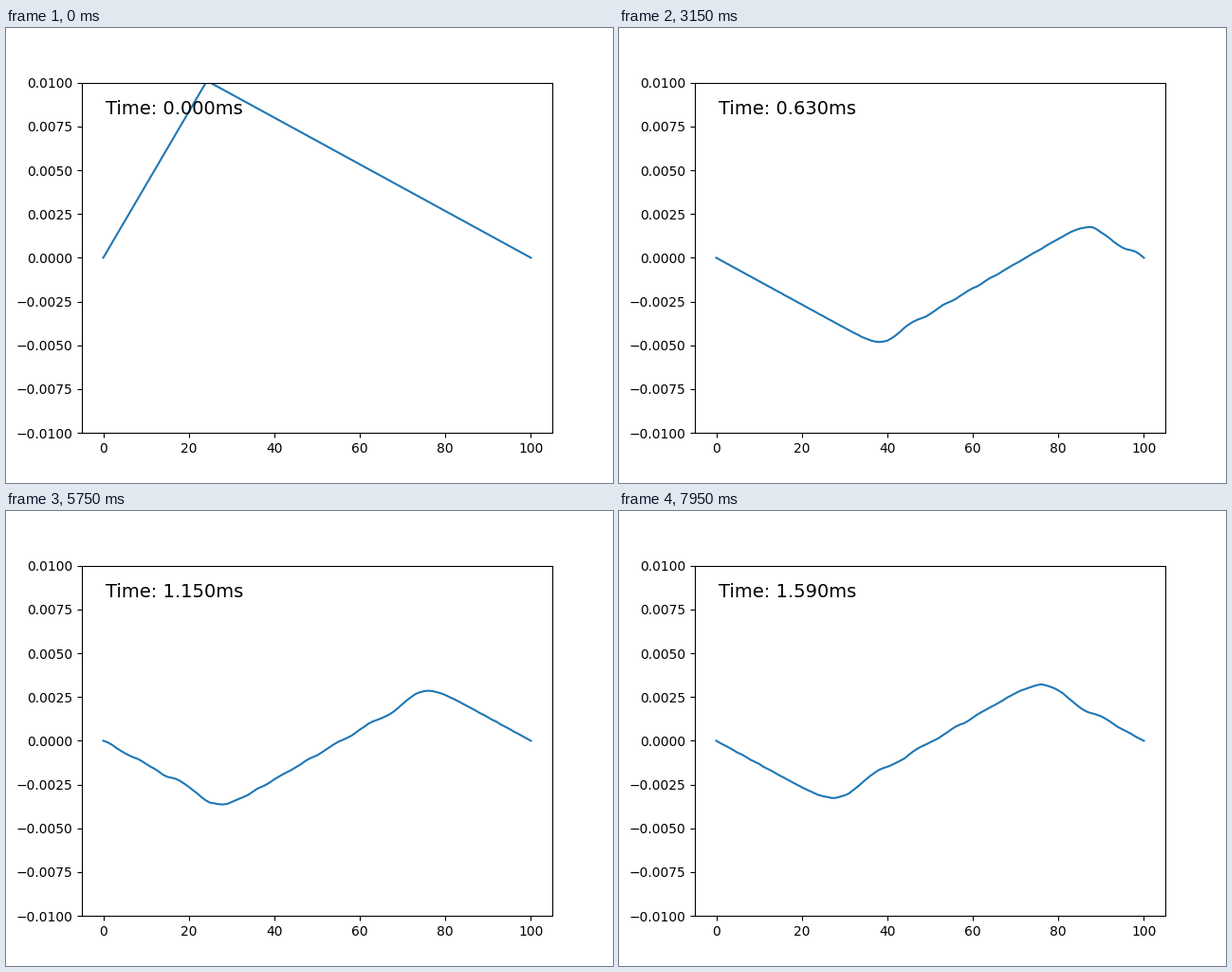
A matplotlib script that plays this animation: 640x480 px, repeating every 8000 ms.

```python
import numpy as np
import matplotlib.pyplot as plt
from matplotlib.animation import FuncAnimation

FRAMES = 160
INTERVAL = 50          # ms on screen per frame
STEPS = 10             # solver steps per frame
DT = 1e-6              # s per solver step

LENGTH = 0.7
PITCH = 1100           # Hz, fundamental of the string
NX = 101
DX = LENGTH / (NX - 1)
SPEED = 2 * LENGTH * PITCH


def pluck():
    """Triangular starting shape, pulled up at a quarter of the string."""
    rise = np.linspace(0, 0.01, 25)
    fall = np.linspace(0.01, 0, NX - 25)
    return np.concatenate([rise, fall])


def solve():
    """Leapfrog solution of the wave equation with fixed ends."""
    r2 = (SPEED * DT / DX) ** 2
    sol = np.zeros((FRAMES * STEPS, NX))
    sol[0] = sol[1] = pluck()
    for n in range(1, len(sol) - 1):
        y = sol[n]
        bend = y[:-2] - 2 * y[1:-1] + y[2:]
        sol[n + 1, 1:-1] = 2 * y[1:-1] - sol[n - 1, 1:-1] + r2 * bend
    return sol[::STEPS]


shapes = solve()

plt.rcParams["font.family"] = "DejaVu Sans"
fig, ax = plt.subplots(figsize=(6.4, 4.8), dpi=100)
string, = ax.plot(np.arange(NX), shapes[0], color="#1f77b4", lw=1.5)
ax.set_ylim(-0.01, 0.01)
clock = ax.text(0.05, 0.95, "", transform=ax.transAxes, fontsize=14, va="top")


def draw(k):
    string.set_ydata(shapes[k])
    clock.set_text(f"Time: {k * STEPS * DT * 1e3:.3f}ms")
    return string, clock


ani = FuncAnimation(fig, draw, frames=FRAMES, interval=INTERVAL,
                    repeat=True, repeat_delay=0)
plt.show()
```
